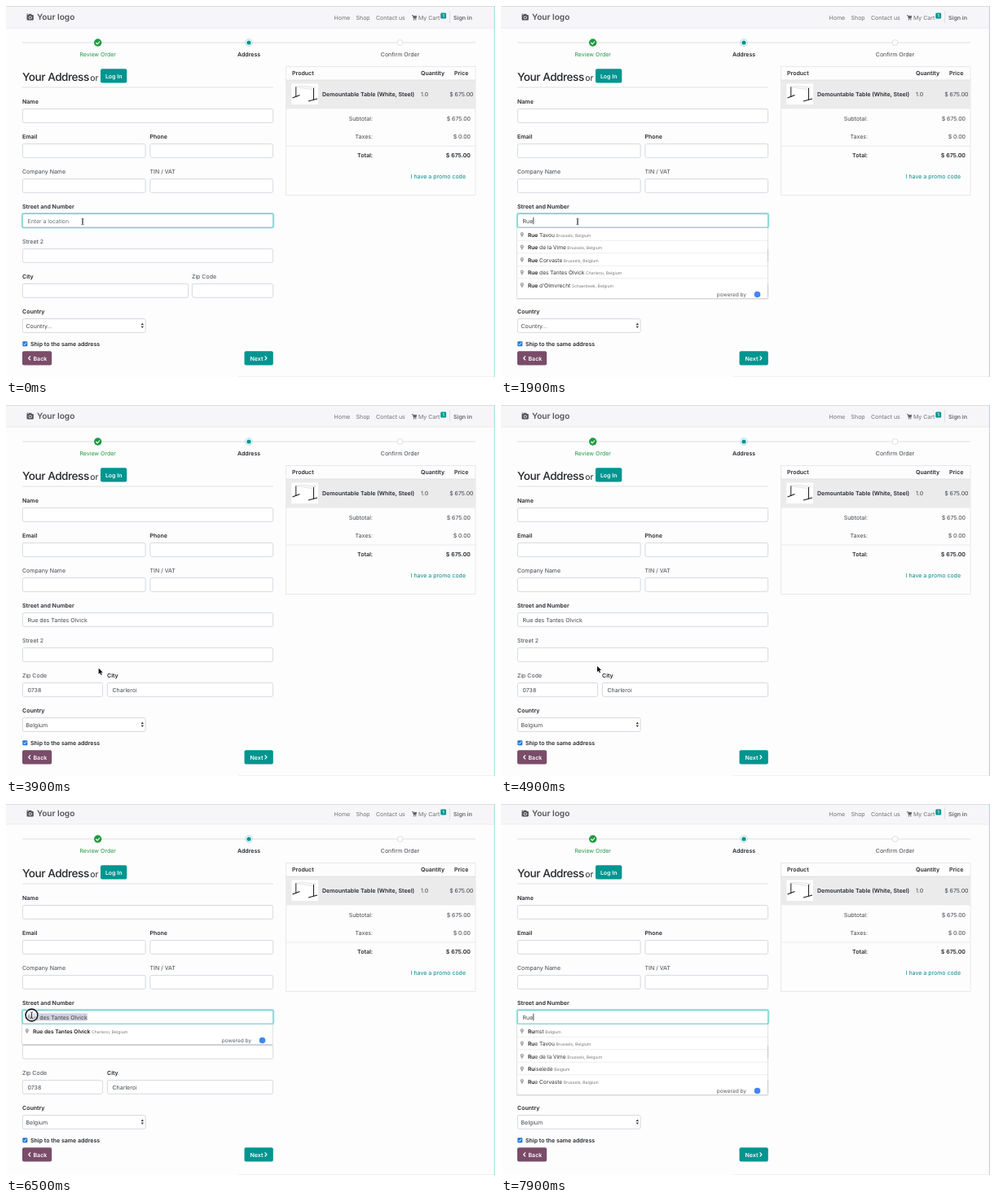
An HTML page that plays this animation: 600x456 px, repeating every 8 s.

```html
<!DOCTYPE html>
<html lang="en">
<head>
<meta charset="utf-8">
<title>Checkout address form</title>
<style>
  html, body { margin: 0; width: 100%; height: 100%; overflow: hidden; background: #fdfdfe; }
  svg { display: block; width: 600px; height: 456px; font: 7px Inter, "Noto Sans", sans-serif; }
  text { white-space: pre; text-rendering: geometricPrecision; }
</style>
</head>
<body>
<svg id="stage" viewBox="0 0 600 456"></svg>
<script>
const LOOP = 8000, STEP = 100;
const TEAL = '#009590', INK = '#25282c', GREY = '#414549';
const STREET = 'Rue des Tantes Olvick';
const stage = document.getElementById('stage');
const pen = document.createElement('canvas').getContext('2d');

const text = (x, y, s, { size = 7, weight = 400, fill = GREY, anchor = 'start', extra = '' } = {}) =>
  `<text x="${x}" y="${y}" font-size="${size}" font-weight="${weight}" fill="${fill}" text-anchor="${anchor}" ${extra}>${s}</text>`;
const bold = (x, y, s, opts) => text(x, y, s, { weight: 600, fill: INK, ...opts });
const rect = (x, y, w, h, fill, extra = '') =>
  `<rect x="${x}" y="${y}" width="${w}" height="${h}" fill="${fill}" ${extra}/>`;
const line = (x1, y1, x2, y2, stroke = '#dfe1e4', width = 0.8) =>
  `<path d="M${x1} ${y1}L${x2} ${y2}" stroke="${stroke}" stroke-width="${width}"/>`;
const path = (d, stroke, width, fill = 'none') =>
  `<path d="${d}" stroke="${stroke}" stroke-width="${width}" fill="${fill}" stroke-linejoin="round"/>`;
const circle = (x, y, r, fill, extra = '') => `<circle cx="${x}" cy="${y}" r="${r}" fill="${fill}" ${extra}/>`;
const box = (x, y, w) => rect(x + 0.4, y + 0.5, w - 0.8, 16.8, '#fff', 'rx="1.8" stroke="#ccd1d8" stroke-width=".8"');
const button = (x, y, w, fill) => rect(x, y, w, 17.2, fill, 'rx="2"');
const textWidth = s => { pen.font = '400 70px Inter, "Noto Sans", sans-serif'; return pen.measureText(s).width / 10; };

// Piecewise eased interpolation over [time, ...values] keys.
function follow(keys, t) {
  const i = keys.findIndex(k => k[0] > t);
  if (i < 0) return keys[keys.length - 1].slice(1);
  if (i === 0) return keys[0].slice(1);
  const a = keys[i - 1], b = keys[i];
  const u = (t - a[0]) / (b[0] - a[0]), e = u * u * (3 - 2 * u);
  return a.slice(1).map((v, j) => v + (b[j + 1] - v) * e);
}

const POINTER = [
  [0, 94, 265], [2200, 94, 265], [2900, 113, 324], [3700, 113, 324], [4600, 118, 321],
  [5000, 118, 321], [5400, 124.5, 312], [5900, 99, 260], [6050, 99, 260], [6500, 31.5, 259.5]
];
const SCROLL = [[4900, 0], [5300, 2]];

const town = (rest, match, place) => ({ match, rest, place });
const FIRST_LIST = [
  town(' Tavou', 'Rue', 'Brussels, Belgium'), town(' de la Vime', 'Rue', 'Brussels, Belgium'),
  town(' Corvaste', 'Rue', 'Brussels, Belgium'), town(' des Tantes Olvick', 'Rue', 'Charleroi, Belgium'),
  town(" d'Olmvrecht", 'Rue', 'Schaerbeek, Belgium')
];
const ONE_MATCH = [town('', STREET, 'Charleroi, Belgium')];
const SECOND_LIST = [
  town('mst', 'Ru', 'Belgium'), town('e Tavou', 'Ru', 'Brussels, Belgium'),
  town('e de la Vime', 'Ru', 'Brussels, Belgium'), town('iselede', 'Ru', 'Belgium'),
  town('e Corvaste', 'Ru', 'Brussels, Belgium')
];

function state(t) {
  const typed = keys => 'Rue'.slice(0, keys.filter(k => t >= k).length);
  const filled = t >= 3700;
  let value = filled ? STREET : typed([300, 550, 800]);
  if (t >= 7400) value = typed([7400, 7600, 7800]);
  let list = null;
  if (t >= 900 && !filled) list = FIRST_LIST;
  if (t >= 6100) list = ONE_MATCH;
  if (t >= 7700) list = SECOND_LIST;
  return {
    value, list, filled,
    focused: !filled || t >= 6050,
    selecting: t >= 6050 && t < 7400,
    pressed: (t >= 3600 && t < 3800) || (t >= 6050 && t < 6700),
    caret: (!filled && (t < 800 || (t - 800) % 1000 < 500)) || t >= 7400,
    pointer: t < 7400,
    scroll: follow(SCROLL, t)[0]
  };
}

function header() {
  const cart = 'M498 11.4h1.2l.9 3.8h3l.8-2.9h-4.4z';
  return rect(0, -2, 600, 29, '#f6f6f8') + line(0, 27, 600, 27, '#e6e6e9')
    + rect(25.5, 11, 8.3, 6.4, '#505257', 'rx=".8"') + rect(28, 9.8, 3.4, 2, '#505257')
    + rect(25.5, 9.6, 2, 1, '#505257') + circle(29.7, 14.2, 2, '#f6f6f8') + circle(29.7, 14.2, 1.2, '#505257')
    + bold(38, 17.4, 'Your logo', { size: 10.1, fill: '#54565b' })
    + [[402.5, 'Home'], [429.5, 'Shop'], [454, 'Contact us'], [506, 'My Cart']]
      .map(([x, s]) => text(x, 16.7, s, { fill: '#6f7176' })).join('')
    + path(cart, '#5d6065', 0.6, '#5d6065') + circle(500.4, 16.8, 0.7, '#5d6065') + circle(502.8, 16.8, 0.7, '#5d6065')
    + rect(533.3, 8.5, 6.8, 7, TEAL, 'rx="1.2"') + bold(536.7, 14, '1', { size: 5.5, fill: '#fff', anchor: 'middle' })
    + line(544.5, 6, 544.5, 21, '#dcdce0') + bold(549, 16.7, 'Sign in', { fill: '#65676c' });
}

function progress() {
  const mid = { anchor: 'middle' };
  return line(20, 45, 576, 45, '#dcdfe3', 1)
    + circle(112.7, 45, 4.7, '#209a41') + path('M110.4 45l1.7 1.8 3-3.3', '#fff', 1.1)
    + circle(298, 45, 4.3, '#fff', 'stroke="#a5d5d6" stroke-width=".9"') + circle(298, 45, 2.6, TEAL)
    + circle(483.5, 45, 3.5, '#fff', 'stroke="#d9dce0" stroke-width=".9"')
    + text(112.7, 62, 'Review Order', { ...mid, fill: '#209a41' })
    + bold(298, 62, 'Address', mid) + text(483.5, 62, 'Confirm Order', mid);
}

function summary() {
  const end = { anchor: 'end' };
  return rect(343.5, 74.5, 232.5, 158, '#fdfdfe', 'stroke="#e3e4e8" stroke-width=".8"')
    + rect(343.5, 91, 232.5, 35.5, '#ebebec') + line(343, 91, 576, 91, '#dcdde0')
    + bold(351, 85.1, 'Product') + bold(509, 85.1, 'Quantity') + bold(550, 85.1, 'Price')
    + rect(350.5, 95.5, 32.5, 25.5, '#fff')
    + path('M355 99.5l8-1.5 17 2-5 2.5z', '#c3c5c8', 0.4, '#f7f7f7')
    + path('M355.8 99.5v12.5M377.5 101v14.5', '#1c1d1f', 1)
    + path('M351.5 113l9-3.5M371 117l11-3', '#1c1d1f', 1.2)
    + bold(388, 111.3, 'Demountable Table (White, Steel)') + text(509, 111.3, '1.0')
    + text(573.5, 111.3, '$ 675.00', end)
    + text(450, 140.5, 'Subtotal:', end) + text(570, 140.5, '$ 675.00', end)
    + text(450, 163, 'Taxes:', end) + text(570, 163, '$ 0.00', end)
    + line(344, 172, 576, 172, '#e3e4e8') + bold(450, 186, 'Total:', end) + bold(570, 186, '$ 675.00', end)
    + text(564, 212.4, 'I have a promo code', { ...end, fill: '#008782' });
}

function form(s) {
  const [zipX, zipW, cityX, cityW] = s.filled ? [20, 99, 124, 204] : [228, 100, 20, 204];
  const white = { fill: '#fff' };
  return bold(20, 92.2, 'Your Address', { size: 13.6, weight: 500, extra: 'letter-spacing="-.48"' })
    + text(103.3, 92.2, 'or', { size: 10.4, fill: INK })
    + button(116, 77.3, 32.3, TEAL) + bold(132.2, 88.5, 'Log In', { ...white, anchor: 'middle' })
    + line(20, 100, 328, 100, '#d6d8dc')
    + bold(20, 120.4, 'Name') + box(20, 126, 308)
    + bold(20, 163.4, 'Email') + box(20, 169, 151.5) + bold(176.5, 163.4, 'Phone') + box(176.5, 169, 151.5)
    + text(20, 206.4, 'Company Name') + box(20, 212, 151.5) + text(176.5, 206.4, 'TIN / VAT') + box(176.5, 212, 151.5)
    + bold(20, 249.4, 'Street and Number') + box(20, 255, 308)
    + text(20, 292.4, 'Street 2') + box(20, 298, 308)
    + text(zipX, 335.4, 'Zip Code') + box(zipX, 341, zipW) + bold(cityX, 335.4, 'City') + box(cityX, 341, cityW)
    + (s.filled ? text(26.5, 352.7, '0738') + text(130.5, 352.7, 'Charleroi') : '')
    + bold(20, 378.4, 'Country') + box(20, 384, 151.5) + text(24.5, 395.7, s.filled ? 'Belgium' : 'Country...')
    + path('M165.6 392l1.7-2.5 1.7 2.5zM165.6 393.6l1.7 2.5 1.7-2.5z', 'none', 0, '#3b3e42')
    + rect(20.3, 412.2, 6, 6, '#1f78d8', 'rx="1"') + path('M21.7 415.2l1.2 1.4 2.1-2.9', '#fff', 0.9)
    + bold(30, 417.6, 'Ship to the same address')
    + button(20, 424.3, 36.1, '#7a4c69') + path('M30 430.4l-2.3 2.5 2.3 2.5', '#fff', 1.3) + bold(33.5, 435.5, 'Back', white)
    + button(292.5, 424.3, 35.3, TEAL) + bold(299.5, 435.5, 'Next', white) + path('M317.6 430.4l2.3 2.5-2.3 2.5', '#fff', 1.3);
}

function streetField(s, mouseX) {
  const end = 26.5 + textWidth(s.value);
  let out = '';
  if (s.focused) {
    out += rect(19.6, 254.8, 308.8, 17.8, '#fff', 'rx="2.4" stroke="#a9e6e3" stroke-width="2"')
      + rect(20.3, 255.5, 307.4, 16.6, '#fff', 'rx="1.8" stroke="#4fc3bf" stroke-width=".8"');
  }
  if (s.selecting) {
    const from = mouseX < 33 ? 26.5 : Math.min(mouseX, end);
    out += rect(from, 259.3, end - from, 9.2, '#cfd0df');
  }
  out += text(26.5, 266.6, s.value || 'Enter a location', { size: s.value ? 7 : 6.9, fill: s.value ? GREY : '#6a6e74' });
  if (s.caret && s.value) out += line(end + 0.6, 259.7, end + 0.6, 268.3, '#222', 0.8);
  return out;
}

function dropdown(list, mx, my) {
  const top = 272.8, rowH = 15.5, h = list.length * rowH + 9;
  const rows = list.map((r, i) => {
    const y = top + i * rowH, mid = y + 8.4;
    const hover = mx > 20 && mx < 327 && my >= y && my < y + rowH;
    return (hover ? rect(20, y, 307, rowH, '#f4f4f6') : '')
      + (i ? line(20, y, 327, y, '#e6e6e8', 0.7) : '')
      + path(`M25.8 ${mid + 3.6}c-.4-2-2.1-2.9-2.1-4.8a2.1 2.1 0 0 1 4.2 0c0 1.9-1.7 2.8-2.1 4.8z`, 'none', 0, '#a2a3a6')
      + circle(25.8, mid - 1.2, 0.7, '#fff')
      + `<text x="33" y="${mid + 2.4}" font-size="6.6" fill="#303236"><tspan font-weight="600" fill="#1c1d20">${r.match}</tspan>${r.rest}`
      + `<tspan dx="1.6" font-size="5.1" fill="#75777c">${r.place}</tspan></text>`;
  }).join('');
  const foot = top + h - 4.8;
  return rect(19.4, top, 308.2, h + 1.4, '#000', 'opacity=".1"') + rect(19.7, top, 307.6, h + 0.5, '#000', 'opacity=".16"')
    + rect(20, top, 307, h, '#fff') + rows
    + text(301, foot + 2.3, 'powered by', { size: 6.5, fill: '#5a5c60', anchor: 'end' })
    + circle(314.5, foot, 3.8, '#4285f4');
}

function pointer(s, x, y) {
  const docY = y + s.scroll;
  const inside = top => x > 20 && x < 328 && docY >= top && docY <= top + 17.5;
  const beam = inside(255) || (!s.list && inside(298));
  const ring = s.pressed
    ? circle(x, y, 7.4, 'rgba(255,255,255,.35)', 'stroke="#fff" stroke-width="2.8"')
      + circle(x, y, 7.4, 'none', 'stroke="#15171c" stroke-width="1.6"') : '';
  const beamPath = `M${x - 1.5} ${y - 3.8}q1.5 0 1.5 1.2v5.2q0 1.2-1.5 1.2M${x + 1.5} ${y - 3.8}q-1.5 0-1.5 1.2v5.2q0 1.2 1.5 1.2`;
  const arrow = `M${x} ${y}v7.2l1.7-1.6 1.2 2.7 1.2-.5-1.2-2.7h2.3z`;
  return ring + (beam ? path(beamPath, '#333', 0.8) : path(arrow, '#fff', 1.2) + path(arrow, 'none', 0, '#111'));
}

let shown = '';
function draw(t) {
  const s = state(t), [x, y] = follow(POINTER, t);
  const html = rect(0, 0, 600, 456, '#fdfdfe')
    + `<g transform="translate(0 ${-s.scroll})">`
    + header() + progress() + summary() + form(s) + streetField(s, x)
    + (s.list ? dropdown(s.list, x, y + s.scroll) : '') + '</g>'
    + line(0, 0.4, 600, 0.4, '#d2d2d6') + line(285, 455.6, 600, 455.6, '#ececef')
    + rect(598.8, 0, 1.2, 456, '#a9e3df')
    + (s.pointer ? pointer(s, x, y) : '');
  if (html !== shown) stage.innerHTML = shown = html;
}

const start = performance.now();
function tick() {
  const t = (performance.now() - start) % LOOP;
  draw(Math.floor(t / STEP) * STEP);
  requestAnimationFrame(tick);
}
tick();
</script>
</body>
</html>
```
